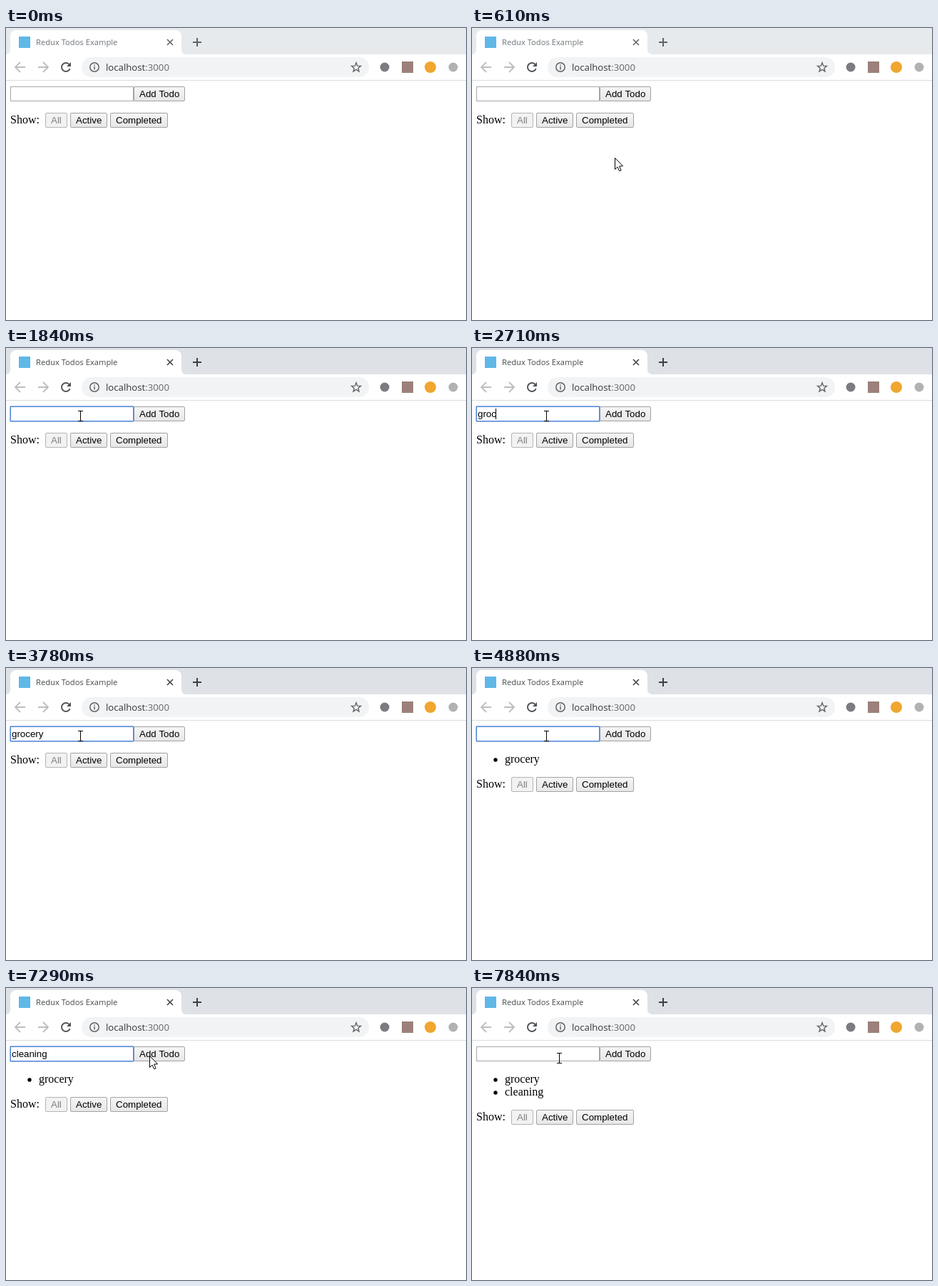
Recreate the animation shown at these times as an HTML page with a canvas. Size 645x410 px, loop 8 s.

```html
<!DOCTYPE html>
<html lang="en">
<head>
<meta charset="utf-8">
<title>Redux Todos Example</title>
<style>
  html, body { margin: 0; width: 100%; height: 100%; overflow: hidden; background: #fff; }
  canvas { display: block; width: 645px; height: 410px; }
</style>
</head>
<body>
<canvas id="stage"></canvas>
<script>
const W = 645, H = 410, LOOP = 8000;
const UI = '"Open Sans", "Noto Sans", sans-serif';
const FORM = '13.3333px "Liberation Sans", Arial, sans-serif';
const BODY = '16px "Liberation Serif", "Times New Roman", serif';

const canvas = document.getElementById('stage');
const dpr = window.devicePixelRatio || 1;
canvas.width = W * dpr;
canvas.height = H * dpr;
const ctx = canvas.getContext('2d');

// Timeline in ms
const ACTIVATE = 1300, ENTER = 4330, PRESS = 7370, RELEASE = 7520;
const WORDS = [
  { text: 'grocery', keys: [2160, 2390, 2540, 2710, 2860, 2940, 3320], end: ENTER },
  { text: 'cleaning', keys: [5580, 5980, 6130, 6210, 6360, 6440, 6590, 6740], end: RELEASE }
];
const CARET_ON = [[ACTIVATE, 1840], [2160, 3780], [ENTER, 4880], [5430, 7290]];

// Pointer stops: [time, x, y], each held until the next
const STOPS = [
  [1000, 95, 104], [1070, 98, 100], [1150, 101, 97], [1230, 103, 95], [1380, 103, 94],
  [1610, 104, 95], [7290, 201, 95], [7370, 202, 94], [7600, 197, 95],
  [7680, 174, 96], [7760, 143, 97], [7840, 122, 98]
];

function pointerAt(t) {
  if (t < 150) return null;
  if (t < 1000) {
    const u = Math.min(10, Math.floor((t - 150) / 77)) / 10;
    const e = 1 - (1 - u) ** 2;
    return [Math.round(529 - 439 * e), Math.round(396 - 285 * e)];
  }
  let stop = STOPS[0];
  for (const s of STOPS) if (t >= s[0]) stop = s;
  return stop.slice(1);
}

function rect(x, y, w, h, color) {
  ctx.fillStyle = color;
  ctx.fillRect(x, y, w, h);
}

function disc(x, y, r, color) {
  ctx.fillStyle = color;
  ctx.beginPath();
  ctx.arc(x, y, r, 0, Math.PI * 2);
  ctx.fill();
}

function roundPath(x, y, w, h, r) {
  ctx.beginPath();
  ctx.moveTo(x + r, y);
  ctx.arcTo(x + w, y, x + w, y + h, r);
  ctx.arcTo(x + w, y + h, x, y + h, r);
  ctx.arcTo(x, y + h, x, y, r);
  ctx.arcTo(x, y, x + w, y, r);
  ctx.closePath();
}

function label(str, x, y, font, color) {
  ctx.font = font;
  ctx.fillStyle = color;
  ctx.fillText(str, x, y);
  return ctx.measureText(str).width;
}

// Each line is a flat list of coordinates
function strokeLines(lines, color, width) {
  ctx.strokeStyle = color;
  ctx.lineWidth = width;
  ctx.beginPath();
  for (const p of lines)
    for (let i = 0; i < p.length; i += 2)
      i ? ctx.lineTo(p[i], p[i + 1]) : ctx.moveTo(p[0], p[1]);
  ctx.stroke();
}

function drawTabs(active) {
  rect(0, 0, W, 37, active ? '#dee1e6' : '#e7eaed');
  ctx.fillStyle = '#fff';
  ctx.beginPath();
  ctx.moveTo(0, 37);
  ctx.quadraticCurveTo(6, 37, 6, 30);
  ctx.lineTo(6, 11);
  ctx.arcTo(6, 3, 14, 3, 8);
  ctx.lineTo(238, 3);
  ctx.arcTo(246, 3, 246, 11, 8);
  ctx.lineTo(246, 30);
  ctx.quadraticCurveTo(246, 37, 253, 37);
  ctx.fill();

  rect(18, 12, 16, 16, '#5fb8e8');
  label('Redux Todos Example', 42, 24, '11.2px ' + UI, active ? '#45494d' : '#70757a');
  const ink = active ? '#3c4043' : '#5f6368';
  strokeLines([[226, 16, 234, 24], [234, 16, 226, 24]], ink, 1.6);
  strokeLines([[262, 20, 274, 20], [268, 14, 268, 26]], ink, 2);
}

function drawArrow(x, dir) {
  strokeLines([
    [x - 7 * dir, 55, x + 7 * dir, 55],
    [x, 48, x - 7 * dir, 55, x, 62]
  ], '#bbbdc0', 1.8);
}

function drawReload() {
  ctx.strokeStyle = '#4d5156';
  ctx.lineWidth = 1.9;
  ctx.beginPath();
  ctx.arc(84, 55, 6, 0.35, Math.PI * 1.75);
  ctx.stroke();
  ctx.fillStyle = '#4d5156';
  ctx.beginPath();
  ctx.moveTo(91, 48);
  ctx.lineTo(91, 54);
  ctx.lineTo(85, 54);
  ctx.fill();
}

function drawStar(cx, cy) {
  ctx.strokeStyle = '#5f6368';
  ctx.lineWidth = 1.4;
  ctx.beginPath();
  for (let i = 0; i < 10; i++) {
    const r = i % 2 ? 2.9 : 6.8, a = -Math.PI / 2 + i * Math.PI / 5;
    ctx.lineTo(cx + r * Math.cos(a), cy + r * Math.sin(a));
  }
  ctx.closePath();
  ctx.stroke();
}

function drawToolbar() {
  rect(0, 73, W, 1, '#dadce0');
  drawArrow(20, 1);
  drawArrow(52, -1);
  drawReload();

  ctx.fillStyle = '#f1f3f4';
  roundPath(106, 41, 403, 28, 14);
  ctx.fill();
  ctx.strokeStyle = '#5f6368';
  ctx.lineWidth = 1.5;
  ctx.beginPath();
  ctx.arc(124, 55, 6.2, 0, Math.PI * 2);
  ctx.stroke();
  rect(123.25, 51.5, 1.5, 1.5, '#5f6368');
  rect(123.25, 54, 1.5, 4.5, '#5f6368');
  const host = label('localhost', 140, 60, '13.2px ' + UI, '#34373b');
  label(':3000', 140 + host, 60, '13.2px ' + UI, '#64686d');
  drawStar(491, 55.5);

  disc(531, 55, 6.5, '#7c7c80');
  rect(555, 47, 16, 16, '#9c807b');
  disc(595, 55, 8, '#f0a62f');
  disc(627, 55, 6.5, '#b2b2b2');
}

function drawButton(str, x, y, w, state) {
  const shade = ctx.createLinearGradient(0, y, 0, y + 21);
  shade.addColorStop(0, state === 'pressed' ? '#dedede' : '#f6f6f6');
  shade.addColorStop(1, state === 'pressed' ? '#ececec' : '#e6e6e6');
  ctx.fillStyle = state === 'disabled' ? '#f2f2f2' : shade;
  roundPath(x + 0.5, y + 0.5, w - 1, 20, 1.5);
  ctx.fill();
  ctx.strokeStyle = state === 'disabled' ? '#b4b4b4' : '#a2a2a2';
  ctx.lineWidth = 1;
  ctx.stroke();
  label(str, x + 8, y + 15, FORM, state === 'disabled' ? '#808080' : '#000');
}

function drawInput(value, focused, caret) {
  ctx.lineWidth = 1;
  ctx.strokeStyle = focused ? '#5488dc' : '#a6a6a6';
  ctx.strokeRect(6.5, 82.5, 172, 20);
  if (focused) {
    ctx.strokeStyle = 'rgba(84,136,220,.6)';
    roundPath(5.5, 81.5, 174, 22, 1.5);
    ctx.stroke();
  }
  const w = label(value, 8, 97, FORM, '#000');
  if (caret) rect(8 + Math.floor(w), 85, 1, 15, '#000');
}

function drawPage(t) {
  const typing = WORDS.find(word => t < word.end);
  const value = typing ? typing.text.slice(0, typing.keys.filter(k => t >= k).length) : '';
  const todos = WORDS.filter(word => t >= word.end);
  const focused = t >= ACTIVATE && t < PRESS;
  const pressed = t >= PRESS && t < RELEASE;

  drawButton('Add Todo', 179, 82, 72, pressed ? 'pressed' : '');
  drawInput(value, focused, CARET_ON.some(([a, b]) => t >= a && t < b));

  todos.forEach((todo, i) => {
    disc(33, 129 + 18 * i, 2.7, '#000');
    label(todo.text, 46, 133 + 18 * i, BODY, '#000');
  });

  const y = 119 + (todos.length ? 16 + 18 * todos.length : 0);
  label('Show:', 6, y + 15, BODY, '#000');
  drawButton('All', 55, y, 31, 'disabled');
  drawButton('Active', 90, y, 52);
  drawButton('Completed', 146, y, 81);
}

function drawPointer([x, y]) {
  if (x < 179 && y >= 82 && y < 105) {
    rect(x, y - 7, 1, 15, '#000');
    for (const dy of [-7, 7]) {
      rect(x - 3, y + dy, 3, 1, '#000');
      rect(x + 1, y + dy, 3, 1, '#000');
    }
    return;
  }
  ctx.save();
  ctx.translate(x + 0.5, y + 0.5);
  ctx.beginPath();
  [[0, 0], [0, 16], [3.6, 12.6], [6.2, 18.3], [8.6, 17.3], [6.1, 11.6], [11, 11.3]]
    .forEach(p => ctx.lineTo(...p));
  ctx.closePath();
  ctx.fillStyle = '#fff';
  ctx.fill();
  ctx.strokeStyle = '#000';
  ctx.lineWidth = 1;
  ctx.stroke();
  ctx.restore();
}

function draw() {
  const t = performance.now() % LOOP;
  ctx.setTransform(dpr, 0, 0, dpr, 0, 0);
  rect(0, 0, W, H, '#fff');
  drawTabs(t >= ACTIVATE);
  drawToolbar();
  drawPage(t);
  const pointer = pointerAt(t);
  if (pointer) drawPointer(pointer);
  requestAnimationFrame(draw);
}
draw();
</script>
</body>
</html>
```
